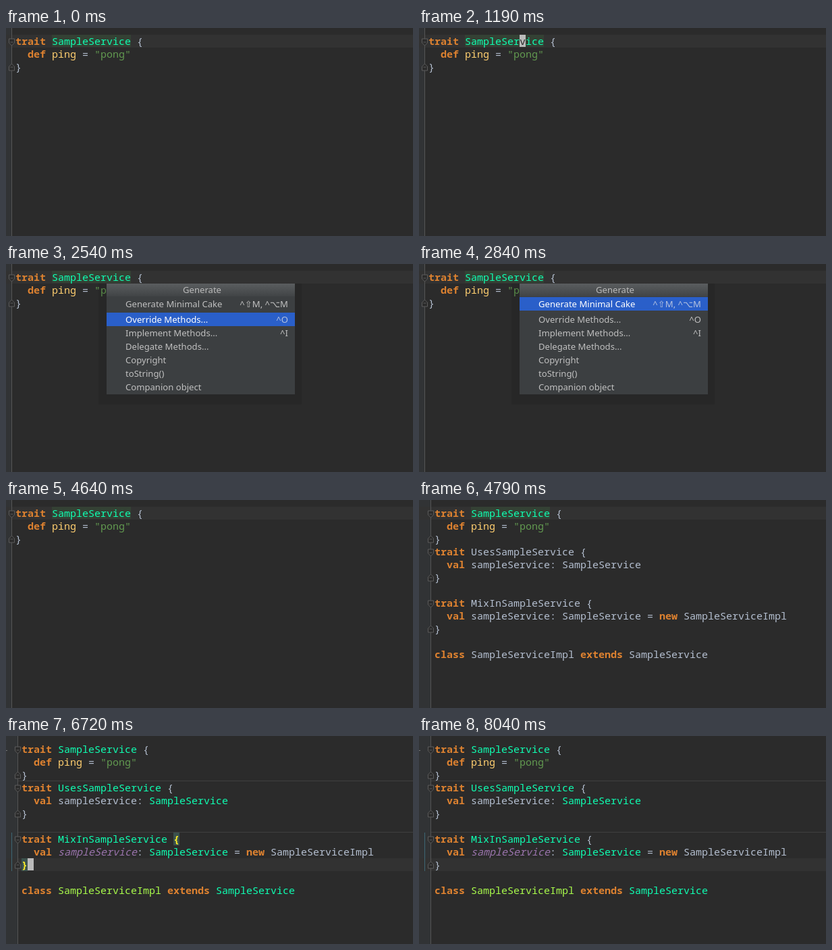
An HTML page with a canvas for the animation above (8060 ms loop, 603x308 px).

```html
<!DOCTYPE html>
<html lang="en">
<head>
<meta charset="utf-8">
<title>Generating code in an editor</title>
<style>
html, body { margin: 0; width: 100%; height: 100%; overflow: hidden; background: #2b2b2b; }
canvas { display: block; }
</style>
</head>
<body>
<canvas id="stage" width="603" height="308"></canvas>
<script>
const ctx = document.getElementById('stage').getContext('2d');
const LOOP = 8060, COL = 9, ROW = 19;
const MONO = '15px "Noto Sans Mono", "DejaVu Sans Mono", monospace';
const SANS = '500 13.1px "Noto Sans", "Open Sans", "DejaVu Sans", sans-serif';

const COLORS = {
  plain: '#b4bfd0', keyword: '#de8230', type: '#0fffb2', method: '#ffcf70',
  string: '#629a50', field: '#9a74ac', cls: '#a9fb4b', brace: '#ffef28'
};
const FONT_STYLE = { keyword: 'bold ', brace: 'bold ', field: 'italic 500 ' };

// Token: [text, style, colouring pass that gives it the style]
const plain = text => [text, 'plain', 0];
const keyword = text => [text, 'keyword', 0];

const SERVICE = [
  [keyword('trait '), ['SampleService', 'type', 0], plain(' {')],
  [keyword('  def '), ['ping', 'method', 0], plain(' = '), ['"pong"', 'string', 0]],
  [plain('}')]
];
const GENERATED = [
  ...SERVICE,
  [keyword('trait '), ['UsesSampleService', 'type', 1], plain(' {')],
  [keyword('  val '), plain('sampleService: '), ['SampleService', 'type', 1]],
  [plain('}')],
  [],
  [keyword('trait '), ['MixInSampleService', 'type', 1], plain(' {')],
  [keyword('  val '), ['sampleService', 'field', 1], plain(': '), ['SampleService', 'type', 1],
    plain(' = '), keyword('new '), plain('SampleServiceImpl')],
  [plain('}')],
  [],
  [keyword('class '), ['SampleServiceImpl', 'cls', 2], keyword(' extends '), ['SampleService', 'type', 2]]
];
const MENU = [
  ['Generate Minimal Cake', '^⇧M, ^⌥M'], ['Override Methods...', '^O'],
  ['Implement Methods...', '^I'], ['Delegate Methods...', ''],
  ['Copyright', ''], ['toString()', ''], ['Companion object', '']
];

function rect(color, x, y, w, h) {
  ctx.fillStyle = color;
  ctx.fillRect(x, y, w, h);
}

function text(str, x, y, color, font, align = 'left') {
  ctx.font = font;
  ctx.fillStyle = color;
  ctx.textAlign = align;
  ctx.fillText(str, x, y);
}

const rowTop = row => 10 + row * ROW;

function code(str, style, left, row, col, color = COLORS[style]) {
  text(str, left + col * COL, rowTop(row) + 15, color, (FONT_STYLE[style] || '500 ') + MONO);
}

function codeLines(lines, left, pass) {
  lines.forEach((tokens, row) => {
    let col = 0;
    for (const [str, style, neededPass] of tokens) {
      code(str, pass >= neededPass ? style : 'plain', left, row, col);
      col += str.length;
    }
  });
}

function caret(left, row, col, letter) {
  rect('#bbbbbb', left + col * COL, rowTop(row), COL, 18);
  if (letter) code(letter, 'plain', left, row, col, '#2b2b2b');
}

function matchedBrace(letter, left, row, col) {
  rect('#3b514d', left + col * COL, rowTop(row), COL, 19);
  code(letter, 'brace', left, row, col);
}

// Fold handle: a small pentagon pointing down at a block's start, up at its end
function fold(x, row, dir) {
  const y = rowTop(row) + 11 - (dir < 0 ? 1 : 0);
  ctx.beginPath();
  ctx.moveTo(x - 4, y - 5 * dir);
  ctx.lineTo(x + 4, y - 5 * dir);
  ctx.lineTo(x + 4, y + dir);
  ctx.lineTo(x, y + 5 * dir);
  ctx.lineTo(x - 4, y + dir);
  ctx.closePath();
  ctx.fillStyle = '#2b2b2b';
  ctx.fill();
  ctx.strokeStyle = '#5c5c5c';
  ctx.lineWidth = 1;
  ctx.stroke();
  rect('#5c5c5c', x - 2, y - 0.5, 4, 1);
}

function background(gutterX, caretRow) {
  rect('#2b2b2b', 0, 0, 603, 308);
  rect('#313335', 0, 0, gutterX, 308);
  rect('#323232', 0, rowTop(caretRow), 603, 19);
  rect('#555555', gutterX, 0, 1, 308);
}

function popup(selected) {
  rect('rgba(0,0,0,.1)', 137, 29, 301, 179);
  rect('#3c3f41', 149, 29, 279, 164);
  const title = ctx.createLinearGradient(0, 29, 0, 48);
  title.addColorStop(0, '#5a5d5f');
  title.addColorStop(1, '#414446');
  rect(title, 149, 29, 279, 19);
  text('Generate', 290.5, 43, '#bbbbbb', SANS, 'center');
  MENU.forEach(([label, shortcut], i) => {
    const top = i ? 52 + i * 20 : 49;
    const active = i === selected;
    if (active) rect('#2a5fc9', 149, top, 279, 20);
    const baseline = top + 15;
    text(label, 177, baseline, active ? '#ffffff' : '#c0c0c0', SANS);
    text(shortcut, 418, baseline, active ? '#b4c2e0' : '#c0c0c0', SANS, 'right');
  });
}

function drawBefore(t) {
  const left = 14;
  background(8, 0);
  rect('#344134', left + 6 * COL, 10, 13 * COL, 18);
  fold(8.5, 0, 1);
  fold(8.5, 2, -1);
  codeLines(SERVICE, left, 2);
  const caretOn = (t >= 300 && t < 750) || (t >= 1190 && t < 1490);
  if (caretOn) caret(left, 0, 15, 'v');
  if (t >= 1490 && t < 4640) popup(t >= 2540 && t < 2840 ? 1 : 0);
}

function drawAfter(t) {
  const left = 23, pass = t < 5080 ? 0 : t < 5230 ? 1 : 2;
  const settled = pass === 2;
  background(17, settled ? 9 : 0);
  if (settled) {
    rect('#3f3f3f', 18, 66, 585, 1);
    rect('#3f3f3f', 18, 142, 585, 1);
    rect('#3d6673', 8, 143, 1, 57);
    rect('#777777', 0, 21, 2, 1);
  } else {
    rect('#344134', left + 6 * COL, 10, 13 * COL, 18);
  }
  for (const row of [0, 3, 7]) {
    fold(17.5, row, 1);
    fold(17.5, row + 2, -1);
  }
  codeLines(GENERATED, left, pass);
  if (settled && t < 8040) {
    matchedBrace('{', left, 7, 25);
    matchedBrace('}', left, 9, 0);
    const caretOn = t < 6280 || (t >= 6720 && t < 7170) || t >= 7770;
    if (caretOn) caret(left, 9, 1);
  }
}

const start = performance.now();
function frame() {
  const t = (performance.now() - start) % LOOP;
  (t < 4790 ? drawBefore : drawAfter)(t);
  requestAnimationFrame(frame);
}
frame();
</script>
</body>
</html>
```
